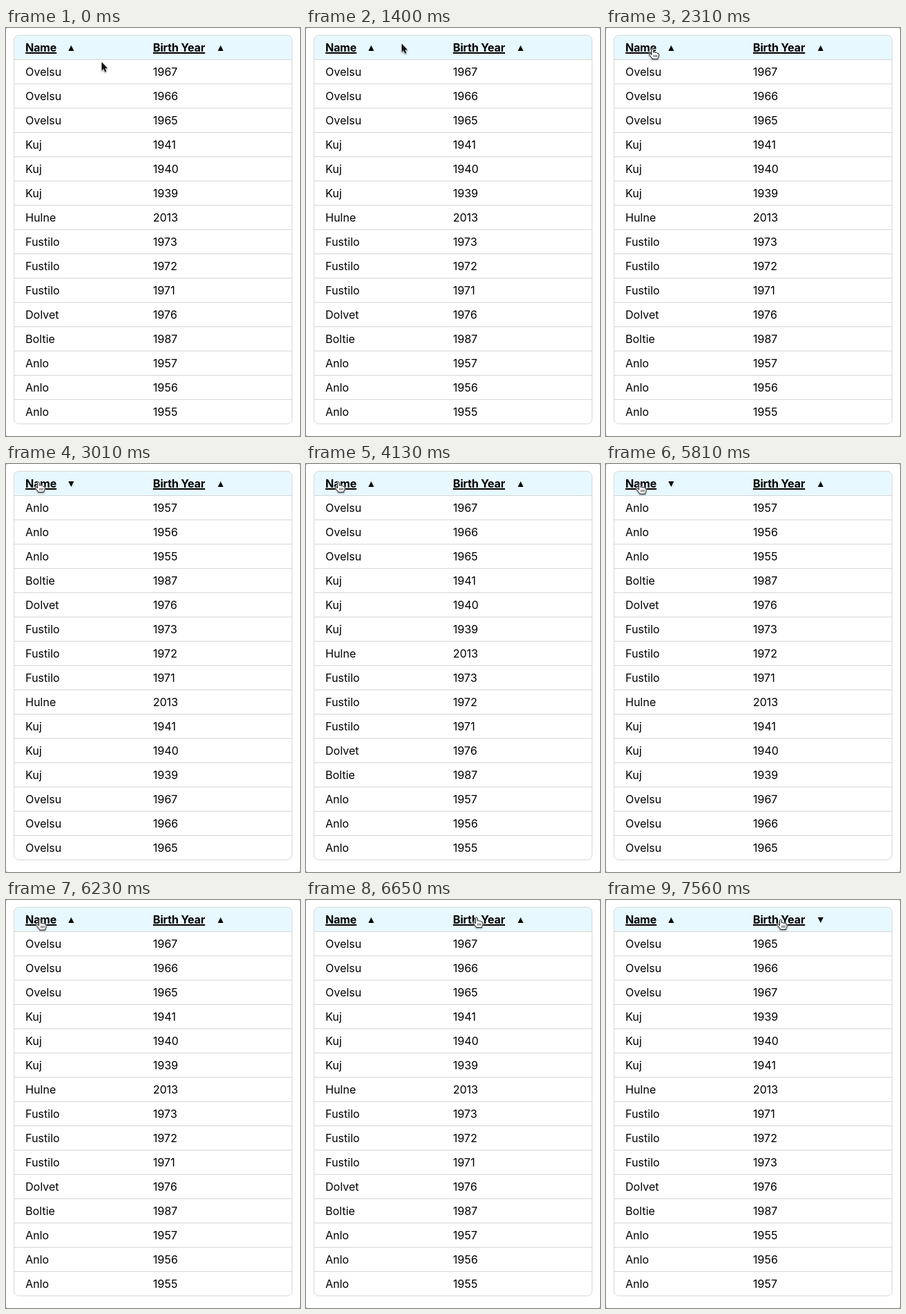
Write an HTML page with a canvas that moves like this. It is 424 by 588 pixels and loops after 8 s.

```html
<!DOCTYPE html>
<html lang="en">
<head>
<meta charset="utf-8">
<title>Sortable table</title>
<style>
  html, body { margin: 0; width: 424px; height: 588px; overflow: hidden; background: #fff; }
  canvas { display: block; width: 424px; height: 588px; }
</style>
</head>
<body>
<canvas id="stage"></canvas>
<script>
const W = 424, H = 588, LOOP = 8000, TICK = 70;
const ROW = 35, LEFT = 11.5, TOP = 10.5, WIDTH = 401, HEIGHT = 560;
const COL_NAME = 28, COL_YEAR = 212;
const LINE = '#d6d6d6';

const canvas = document.getElementById('stage');
const ctx = canvas.getContext('2d');
const dpr = window.devicePixelRatio || 1;
canvas.width = W * dpr;
canvas.height = H * dpr;

// name, latest year, number of consecutive years
const people = [
  ['Ovelsu', 1967, 3], ['Kuj', 1941, 3], ['Hulne', 2013, 1], ['Fustilo', 1973, 3],
  ['Dolvet', 1976, 1], ['Boltie', 1987, 1], ['Anlo', 1957, 3],
];

// start, end, destination x, y
const moves = [
  [0, 280, 51, 35], [1120, 1400, 138, 22.5], [2100, 2470, 47, 26],
  [5250, 5530, 49, 28.5], [6300, 6650, 246, 25], [7140, 7420, 252, 28],
];
const HAND_FROM = 2240;
const PRESS = 140;
const releases = [1820, 2870, 4130, 5320, 6230, 7070];

function pointerAt(t) {
  let x = 138, y = 49;
  for (const [start, end, toX, toY] of moves) {
    if (t < start) break;
    const k = Math.min(1, (t - start) / (end - start));
    const eased = Math.sin(k * Math.PI / 2);
    x += (toX - x) * eased;
    y += (toY - y) * eased + 5 * Math.sin(k * Math.PI);
  }
  return { x, y, hand: t >= HAND_FROM };
}

function sortStateAt(t) {
  const state = { nameUp: false, yearUp: false };
  for (const time of releases.filter(time => time <= t)) {
    const pointer = pointerAt(time);
    if (!pointer.hand) continue;
    const key = pointer.x < COL_YEAR ? 'nameUp' : 'yearUp';
    state[key] = !state[key];
  }
  return state;
}

function sortedRows({ nameUp, yearUp }) {
  const groups = nameUp ? [...people].reverse() : people;
  return groups.flatMap(([name, last, count]) =>
    Array.from({ length: count }, (_, i) => [name, yearUp ? last - count + 1 + i : last - i]));
}

function text(label, x, y, weight = 400) {
  ctx.font = `${weight} 16px Inter, sans-serif`;
  ctx.letterSpacing = weight > 400 ? '-0.18px' : '0px';
  ctx.fillText(label, x, y);
  return ctx.measureText(label).width;
}

function heading(label, x, triangleX, down) {
  const width = text(label, x, 34, 700);
  ctx.fillRect(x, 35, width, 2);
  const direction = down ? 1 : -1;
  ctx.beginPath();
  ctx.moveTo(triangleX - 4, 29 - 4 * direction);
  ctx.lineTo(triangleX + 4, 29 - 4 * direction);
  ctx.lineTo(triangleX, 29 + 4 * direction);
  ctx.fill();
}

function drawTable(state) {
  const frame = new Path2D();
  frame.roundRect(LEFT, TOP, WIDTH, HEIGHT, 7);
  ctx.save();
  ctx.clip(frame);
  ctx.fillStyle = '#e7f9ff';
  ctx.fillRect(LEFT, TOP, WIDTH, ROW);
  ctx.fillStyle = LINE;
  for (let i = 1; i < 16; i++) ctx.fillRect(LEFT, 10 + i * ROW, WIDTH, 1);
  ctx.restore();
  ctx.strokeStyle = LINE;
  ctx.lineWidth = 1;
  ctx.stroke(frame);

  ctx.fillStyle = '#000';
  heading('Name', COL_NAME, 94, state.nameUp);
  heading('Birth Year', COL_YEAR, 309.5, state.yearUp);
  sortedRows(state).forEach(([name, year], i) => {
    const y = 69 + i * ROW;
    text(name, COL_NAME, y);
    text(String(year), COL_YEAR, y);
  });
}

const arrow = new Path2D('M0 0 V12.2 L2.7 9.7 4.7 14.3 6.8 13.4 4.8 8.9 H8.5 Z');
const hand = new Path2D(`M-1.6 9 V1 Q-.3 -1.6 1.1 1 V5 Q2.6 4 3.8 5.4 Q5.4 4.6 6.4 6
  Q9 5.8 9 8.4 V10 Q8.8 12 7.6 13.4 V14.6 H-.6 V13.8 L-5 8.2 Q-5 5 -1.6 8.4`);

function drawPointer({ x, y, hand: isHand }) {
  ctx.save();
  ctx.translate(x, y);
  ctx.lineJoin = 'round';
  ctx.shadowColor = 'rgba(0,0,0,.3)';
  ctx.shadowBlur = 2 * dpr;
  ctx.shadowOffsetY = dpr;
  ctx.fillStyle = ctx.strokeStyle = '#fff';
  ctx.lineWidth = 1.6;
  const shape = isHand ? hand : arrow;
  ctx.stroke(shape);
  ctx.fill(shape);
  ctx.shadowColor = 'transparent';
  ctx.fillStyle = ctx.strokeStyle = '#111';
  ctx.lineWidth = 1;
  if (isHand) {
    ctx.stroke(hand);
    for (let i = 0; i < 3; i++) ctx.fillRect(1.4 + 2.1 * i, 8.5, .8, 3.5);
  } else {
    ctx.fill(arrow);
  }
  ctx.restore();
}

function drawClick(t, pointer) {
  if (!releases.some(time => t >= time - PRESS && t < time)) return;
  ctx.strokeStyle = 'rgba(0,0,0,.45)';
  ctx.lineWidth = 2;
  ctx.beginPath();
  ctx.arc(pointer.x - 1, pointer.y + 1, pointer.hand ? 30 : 21, 0, Math.PI * 2);
  ctx.stroke();
}

function draw(t) {
  ctx.setTransform(dpr, 0, 0, dpr, 0, 0);
  ctx.fillStyle = '#777';
  ctx.fillRect(0, 0, W, H);
  ctx.fillStyle = '#fff';
  ctx.beginPath();
  ctx.roundRect(0, 0, W, H, 2);
  ctx.fill();

  const pointer = pointerAt(t);
  drawTable(sortStateAt(t));
  drawClick(t, pointer);
  drawPointer(pointer);
}

function frame() {
  const t = performance.now() % LOOP;
  draw(Math.floor(t / TICK) * TICK);
  requestAnimationFrame(frame);
}
frame();
</script>
</body>
</html>
```
